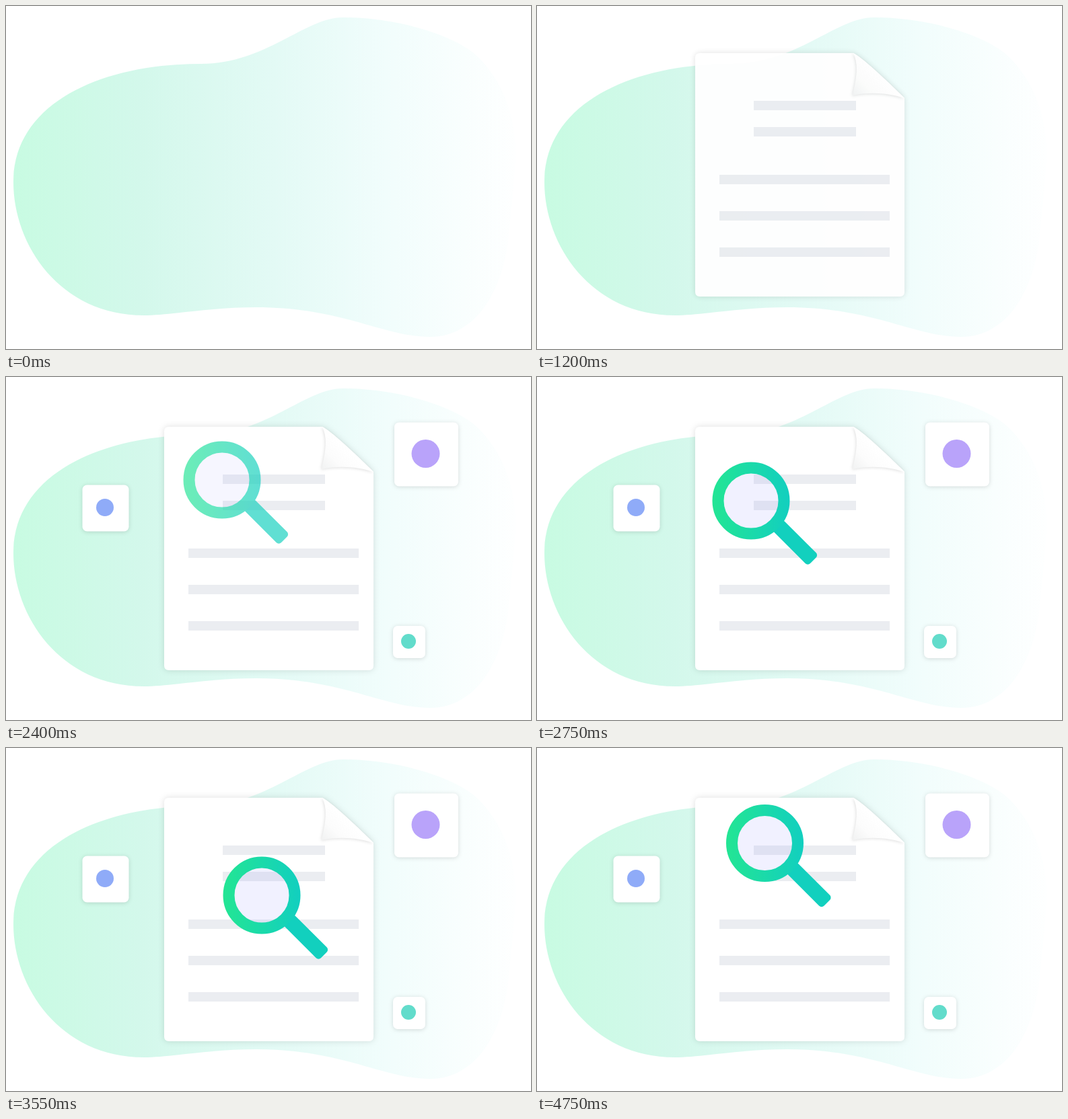
An HTML page that plays this animation: 780x510 px, repeating every 4800 ms.

```html
<!DOCTYPE html>
<html lang="en">
<head>
<meta charset="utf-8">
<title>Document search</title>
<style>
  html, body { margin: 0; width: 100%; height: 100%; overflow: hidden; background: #fff; }
  svg { display: block; width: 780px; height: 510px; }
  #paper { filter: drop-shadow(0 0 5px rgba(0, 0, 0, .13)); }
  #flap { filter: drop-shadow(-1px 1px 2px rgba(0, 0, 0, .12)); }
  .card { filter: drop-shadow(0 1px 3px rgba(0, 0, 0, .14)); }
</style>
</head>
<body>
<svg viewBox="0 0 780 510">
  <defs>
    <linearGradient id="mint" gradientUnits="userSpaceOnUse" x1="11" y1="0" x2="757" y2="0">
      <stop offset="0" stop-color="#c8fbe2"/>
      <stop offset=".25" stop-color="#d3f8eb"/>
      <stop offset=".52" stop-color="#e3faf5"/>
      <stop offset=".74" stop-color="#f1fdfc"/>
      <stop offset="1" stop-color="#feffff"/>
    </linearGradient>
    <linearGradient id="curl" gradientUnits="userSpaceOnUse" x1="469" y1="137" x2="503" y2="103">
      <stop offset="0" stop-color="#f1f2f2"/>
      <stop offset=".5" stop-color="#fcfcfc"/>
      <stop offset="1" stop-color="#fff"/>
    </linearGradient>
    <linearGradient id="rim" gradientUnits="userSpaceOnUse" x1="-57" y1="0" x2="57" y2="0">
      <stop offset="0" stop-color="#23e594"/>
      <stop offset="1" stop-color="#12cfbf"/>
    </linearGradient>
  </defs>

  <path fill="url(#mint)" d="M11 262C11 145 140 86 290 86C385 86 445 17 500 17C580 17 660 42 695 70
    C735 105 757 160 757 215C757 250 752 290 748 330C742 420 700 492 630 492
    C560 492 500 448 372 448C300 448 245 460 205 460C80 460 11 355 11 262Z"/>

  <g id="paper">
    <path fill="#fff" d="M242 74H470C486 82 533 128 546 141V429q0 7-7 7H242q-7 0-7-7V81q0-7 7-7Z"/>
    <path id="flap" fill="url(#curl)" d="M470 74C480 95 472 120 469 137C495 131 525 134 546 141C533 128 486 82 470 74Z"/>
    <path fill="#ebedf1" d="M322 145h152v14h-152zM322 184h152v14h-152zM271 255h253v14h-253zM271 309h253v14h-253zM271 363h253v14h-253z"/>
  </g>

  <g id="cards"></g>

  <g id="lens">
    <rect x="52" y="-13.6" width="76" height="22.4" rx="5" transform="rotate(45)" fill="#12d0be"/>
    <circle r="41" fill="rgb(100,100,255)" fill-opacity=".09"/>
    <circle r="49" fill="none" stroke="url(#rim)" stroke-width="17"/>
  </g>
</svg>

<script>
const LOOP = 4800, STEP = 50;
const $ = id => document.getElementById(id);
const progress = (t, from, to) => Math.min(1, Math.max(0, (t - from) / (to - from)));
const easeOut = p => 1 - (1 - p) ** 2;

// Resting centre, size, start offset and badge of each card
const cards = [
  { x: 148, y: 195, size: 69, dx: 240, dy: 41, r: 13, color: '#8fabf8' },
  { x: 624.5, y: 115, size: 95, dx: -232, dy: 82, r: 21, color: '#b9a3fa' },
  { x: 599, y: 394, size: 48, dx: -230, dy: -115, r: 11, color: '#62dccb' }
];
for (const c of cards) {
  $('cards').insertAdjacentHTML('beforeend', `<g class="card">
    <rect x="${-c.size / 2}" y="${-c.size / 2}" width="${c.size}" height="${c.size}" rx="7" fill="#fff"/>
    <circle cx="-1" cy="-1" r="${c.r}" fill="${c.color}"/></g>`);
  c.node = $('cards').lastElementChild;
}

// Lens path: time, x, y
const route = [
  [2500, 321, 153], [2600, 316.5, 166], [2750, 318, 184], [2900, 321, 196],
  [3050, 327, 206], [3200, 340, 215], [3400, 363, 223], [3550, 380, 219],
  [3700, 394.5, 211], [3850, 406, 198], [4000, 412, 182], [4150, 412, 165.5],
  [4300, 404.5, 151.5], [4500, 378, 135], [4700, 346, 138.5], [4750, 338.5, 141.5]
];
const slope = (i, k) => {
  const a = route[Math.max(0, i - 1)], b = route[Math.min(route.length - 1, i + 1)];
  return (b[k] - a[k]) / (b[0] - a[0]);
};
function along(t, k) {
  if (t <= route[0][0]) return route[0][k];
  const i = Math.min(route.length - 2, route.findLastIndex(p => p[0] <= t));
  const a = route[i], b = route[i + 1], span = b[0] - a[0];
  const s = (t - a[0]) / span, s2 = s * s, s3 = s2 * s;
  return (2 * s3 - 3 * s2 + 1) * a[k] + (s3 - 2 * s2 + s) * span * slope(i, k)
    + (3 * s2 - 2 * s3) * b[k] + (s3 - s2) * span * slope(i + 1, k);
}

function place(node, x, y, opacity) {
  node.setAttribute('transform', `translate(${x} ${y})`);
  node.setAttribute('opacity', opacity);
}

function render(t) {
  const drop = progress(t, 0, 1250);
  place($('paper'), 0, -100 * (1 - drop), drop);
  const spread = easeOut(progress(t, 1400, 2225));
  for (const c of cards) {
    place(c.node, c.x + c.dx * (1 - spread), c.y + c.dy * (1 - spread), spread);
  }
  place($('lens'), along(t, 1), along(t, 2), progress(t, 2200, 2500));
}

const start = performance.now();
function tick() {
  const t = (performance.now() - start) % LOOP;
  render(Math.floor(t / STEP) * STEP);
  requestAnimationFrame(tick);
}
render(0);
requestAnimationFrame(tick);
</script>
</body>
</html>
```
